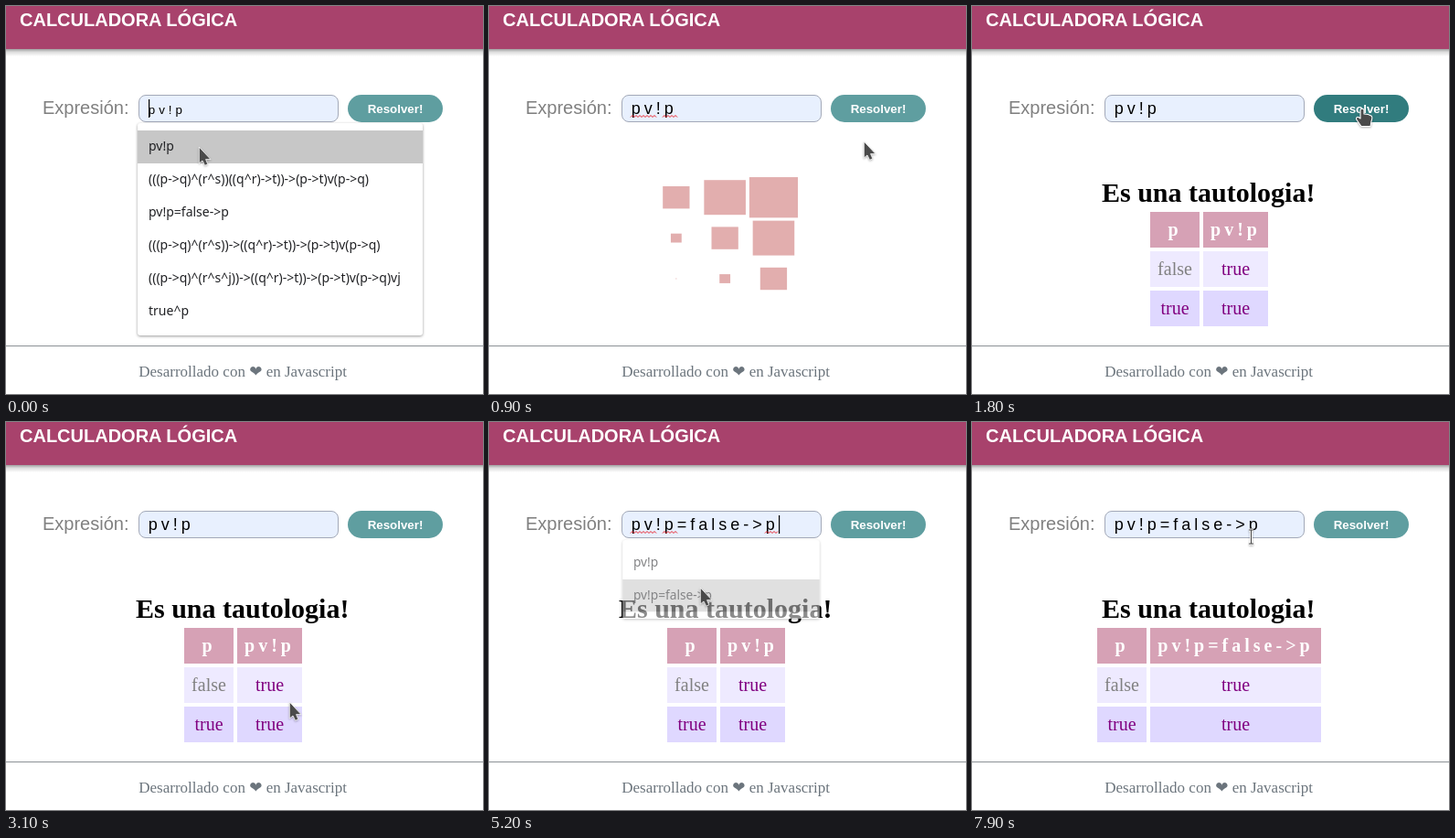
These frames come from a looping animation (522 px wide and 424 px high, 8000 ms). An HTML page:

```html
<!DOCTYPE html>
<html lang="es">
<head>
<meta charset="utf-8">
<title>Calculadora lógica</title>
<style>
  html, body { margin: 0; width: 100%; height: 100%; overflow: hidden; background: #fff; }
  svg { display: block; width: 522px; height: 424px; }
  .sans { font-family: "Liberation Sans", Arial, sans-serif; }
  .serif { font-family: "Liberation Serif", "DejaVu Sans", serif; }
  .menu { font: 500 14px "Noto Sans", sans-serif; fill: #202124; }
  .preview, .value { font: 18px "Liberation Sans", Arial, sans-serif; letter-spacing: 4px; }
  .preview { font-size: 13.33px; }
  .panel { filter: drop-shadow(0 1px 1.5px rgba(0, 0, 0, .4)); }
  .th { font-weight: bold; letter-spacing: 4px; fill: #fff; }
  .cursor { filter: drop-shadow(0 1px 1px rgba(0, 0, 0, .3)); }
</style>
</head>
<body>
<svg viewBox="0 0 522 424" xmlns="http://www.w3.org/2000/svg">
  <defs>
    <linearGradient id="fall" x2="0" y2="1">
      <stop offset="0" stop-color="#000" stop-opacity=".38"/>
      <stop offset=".4" stop-color="#000" stop-opacity=".14"/>
      <stop offset="1" stop-color="#000" stop-opacity="0"/>
    </linearGradient>
    <filter id="soft" x="-10%" y="-40%" width="120%" height="180%"><feGaussianBlur stdDeviation="1.5"/></filter>
  </defs>
  <rect width="522" height="424" fill="#fff"/>
  <rect y="47" width="522" height="8" fill="url(#fall)"/>
  <rect width="522" height="47" fill="#a8426c"/>
  <text class="sans" x="15" y="22" font-size="20" font-weight="bold" fill="#fff">CALCULADORA LÓGICA</text>
  <text class="sans" x="40" y="118" font-size="20" fill="#808080">Expresión:</text>
  <rect y="371" width="522" height="1" fill="#8b9195"/>
  <text class="serif" x="145.3" y="405" font-size="17" fill="#6c757d">Desarrollado con ❤ en Javascript</text>

  <rect id="glow" x="145" y="98" width="219" height="30" rx="8" fill="#000" opacity=".45" filter="url(#soft)"/>
  <rect x="145.5" y="97.5" width="218" height="29" rx="7.5" fill="#e8f0fe" stroke="#a3a9b8"/>
  <text id="field" x="155.8" y="118" fill="#000"></text>
  <path id="wavy" fill="none" stroke="#e8202a"/>
  <rect id="caret" y="102" width="1.2" height="20" fill="#000"/>

  <rect id="button" x="374" y="97" width="104" height="30" rx="15"/>
  <text class="sans" x="426" y="117" font-size="13.33" font-weight="bold" fill="#fff" text-anchor="middle">Resolver!</text>

  <g id="cubes" fill="#e2aeae"></g>
  <g id="result" class="serif">
    <text x="258.7" y="214" font-size="30" font-weight="bold" text-anchor="middle">Es una tautologia!</text>
  </g>
  <g id="menus"></g>

  <g id="cursor" class="cursor" fill="#4a4a4a" stroke="#fff" stroke-linejoin="round">
    <path id="arrow" d="M.3 0V18L4 15L6.6 20.3L9.8 18.8L7.6 13.6H13Z" stroke-width=".8"/>
    <path id="hand" d="M-2 1.5Q0 -1 2 1.5V6Q7 6 10.3 8.3Q11.5 10 10 14L9 19.5H-1L-6.5 11.8Q-6.5 8.7 -4 9.5L-2 11Z" stroke-width="1.1"/>
    <g id="beam" fill="none">
      <path d="M-2.5 -7.5H2.5M0 -7.5V7.5M-2.5 7.5H2.5" stroke-width="3"/>
      <path d="M-2.5 -7.5H2.5M0 -7.5V7.5M-2.5 7.5H2.5" stroke="#444" stroke-width="1.1"/>
    </g>
  </g>
</svg>
<script>
const LOOP = 8000;
const SHORT = "pv!p";
const LONG = "pv!p=false->p";
const $ = id => document.getElementById(id);

function set(el, attrs) {
  for (const k in attrs) el.setAttribute(k, attrs[k]);
  return el;
}

function add(parent, tag, attrs, text = "") {
  const el = set(document.createElementNS("http://www.w3.org/2000/svg", tag), attrs);
  el.textContent = text;
  return parent.appendChild(el);
}

const show = (el, on) => set(el, { visibility: on ? "visible" : "hidden" });
const ease = k => (1 - Math.cos(Math.PI * k)) / 2;

// ---- suggestion menus
function makeMenu(items, width) {
  const height = items.length * 36 + 16;
  const g = add($("menus"), "g", { class: "menu" });
  add(g, "rect", { class: "panel", x: 144, y: 128, width, height, rx: 3, fill: "#fff" });
  const bar = add(g, "rect", { x: 144, width, height: 36, fill: "#c7c7c7" });
  items.forEach((s, i) => add(g, "text", { x: 156, y: 158 + 36 * i }, s));
  return { g, bar, cx: 144 + width / 2, cy: 128 + height / 2 };
}

function setMenu({ g, bar, cx, cy }, alpha, hot) {
  const scale = alpha < 1 ? 0.98 : 1;
  set(show(g, alpha > 0), {
    opacity: alpha,
    transform: `translate(${cx} ${cy}) scale(${scale}) translate(${-cx} ${-cy})`
  });
  set(bar, { opacity: hot < 0 ? 0 : 1, y: 136 + 36 * hot });
}

const fullMenu = makeMenu([
  SHORT,
  "(((p->q)^(r^s))((q^r)->t))->(p->t)v(p->q)",
  LONG,
  "(((p->q)^(r^s))->((q^r)->t))->(p->t)v(p->q)",
  "(((p->q)^(r^s^j))->((q^r)->t))->(p->t)v(p->q)vj",
  "true^p"
], 312);
const shortMenu = makeMenu([SHORT, LONG], 220);

// ---- truth tables
function makeTable(expr, x, width) {
  const g = add($("result"), "g", { "font-size": 20 });
  const cell = (row, col, fill, text, style) => {
    const left = x + 58 * col, w = col ? width : 54, y = 225 + 43 * row;
    add(g, "rect", { x: left, y, width: w, height: 39, fill });
    // trailing letter spacing counts towards the centred width
    add(g, "text", { x: left + w / 2, y: y + 26, "text-anchor": "middle", ...style }, text);
  };
  const yes = { fill: "#800080" };
  ["p", expr].forEach((s, col) => cell(0, col, "#d6a1b5", s, { class: "th" }));
  cell(1, 0, "#eeeaff", "false", { fill: "#808080" });
  cell(1, 1, "#eeeaff", "true", yes);
  cell(2, 0, "#dfd8ff", "true", yes);
  cell(2, 1, "#dfd8ff", "true", yes);
  return g;
}

const tableA = makeTable(SHORT, 195, 71);
const tableB = makeTable(LONG, 137, 187);

// ---- loading cubes: shrink, grow, rest; the wave starts at the lower left
const CUBE_W = 53.3, CUBE_H = 44.4, CYCLE = 1300, SHRINK = 455;
const cubes = Array.from({ length: 9 }, () => add($("cubes"), "rect", {}));

function setCubes(t) {
  cubes.forEach((el, i) => {
    const col = i % 3, row = Math.floor(i / 3);
    const phase = (t - 487 - 100 * (col + 2 - row) + 2 * CYCLE) % CYCLE;
    const size = phase < 2 * SHRINK ? 1 - ease(phase / SHRINK) : 1;
    const width = CUBE_W * size, height = CUBE_H * size;
    set(el, {
      x: 178.2 + CUBE_W * (col + 0.5) - width / 2,
      y: 187 + CUBE_H * (row + 0.5) - height / 2,
      width, height
    });
  });
}

// ---- pointer: eased moves between the places it visits
const MOVES = [
  { from: 100, to: 900, x: 410, y: 148 },
  { from: 1000, to: 1700, x: 427, y: 112 },
  { from: 2500, to: 2700, x: 220, y: 283 },
  { from: 2800, to: 3100, x: 310, y: 306 },
  { from: 3100, to: 3400, x: 180, y: 290 },
  { from: 3400, to: 3900, x: 223.5, y: 112.5 },
  { from: 4400, to: 4900, x: 231, y: 181 },
  { from: 5300, to: 6200, x: 402, y: 113 },
  { from: 6800, to: 7200, x: 190, y: 246 },
  { from: 7200, to: 7700, x: 303, y: 190 },
  { from: 7700, to: 7900, x: 305.5, y: 125.5 }
];

function pointerAt(t) {
  let x = 211, y = 154;
  for (const m of MOVES) {
    if (t <= m.from) break;
    const k = ease(Math.min(1, (t - m.from) / (m.to - m.from)));
    x += (m.x - x) * k;
    y += (m.y - y) * k;
  }
  return [x, y];
}

const within = (x, y, l, t, r, b) => x >= l && x <= r && y >= t && y <= b;

// the screen refreshes ten times a second and stalls while loading
function snap(t) {
  if (t >= 500 && t < 900) return 500;
  if (t >= 900 && t < 1100) return 900;
  return Math.floor(t / 100) * 100;
}

function wave(from, to) {
  let d = `M${from} 121.5`;
  for (let x = from + 2, up = true; x <= to; x += 2, up = !up) d += `L${x} ${up ? 119.5 : 121.5}`;
  return d;
}

function render(time) {
  const t = snap(time);
  const during = (a, b) => t >= a && t < b;
  const [x, y] = pointerAt(t);

  // menus
  const fading = s => t === s ? 0.55 : t === s + 100 ? 0.12 : 0;
  const shortOpen = during(4100, 5200);
  const hot = during(4500, 5400) ? Math.max(-1, Math.floor((y - 136) / 36)) : -1;
  setMenu(fullMenu, t < 100 ? 1 : fading(100), 0);
  setMenu(shortMenu, shortOpen ? 1 : t === 4000 ? 0.55 : fading(5200), hot);

  // input
  const preview = t < 100 || (shortOpen && hot >= 0);
  const long = t >= 5200 || (shortOpen && hot === 1);
  set($("field"), { class: preview ? "preview" : "value" }).textContent = long ? LONG : SHORT;
  show($("glow"), during(3800, 4600));
  show($("caret"), t < 900 || during(1100, 1600) || during(3900, 5700));
  set($("caret"), { x: preview ? 156 : long ? 317 : 206.6 });
  const misspelt = during(900, 1700) || during(5200, 6200);
  set(show($("wavy"), misspelt), { d: wave(155, 183) + wave(190, 206) + (long ? wave(302, 317) : "") });

  // results
  const solved = t >= 1800;
  show($("cubes"), !solved);
  setCubes(t);
  $("result").style.display = solved ? "" : "none";
  show(tableA, t < 6400);
  show(tableB, t >= 6400);

  // pointer
  const overButton = within(x, y, 374, 97, 478, 127);
  const overField = within(x, y, 145, 97, 364, 127);
  const overHeading = solved && !shortOpen && within(x, y, 142, 188, 375, 222);
  const overText = overField || overHeading;
  set($("button"), { fill: overButton ? "#317c7e" : "#5f9ea0" });
  show($("hand"), overButton);
  show($("beam"), overText);
  show($("arrow"), !overButton && !overText);
  set($("cursor"), { transform: `translate(${x} ${y})` });
}

const start = performance.now();
function tick() {
  render((performance.now() - start) % LOOP);
  requestAnimationFrame(tick);
}
tick();
</script>
</body>
</html>
```
